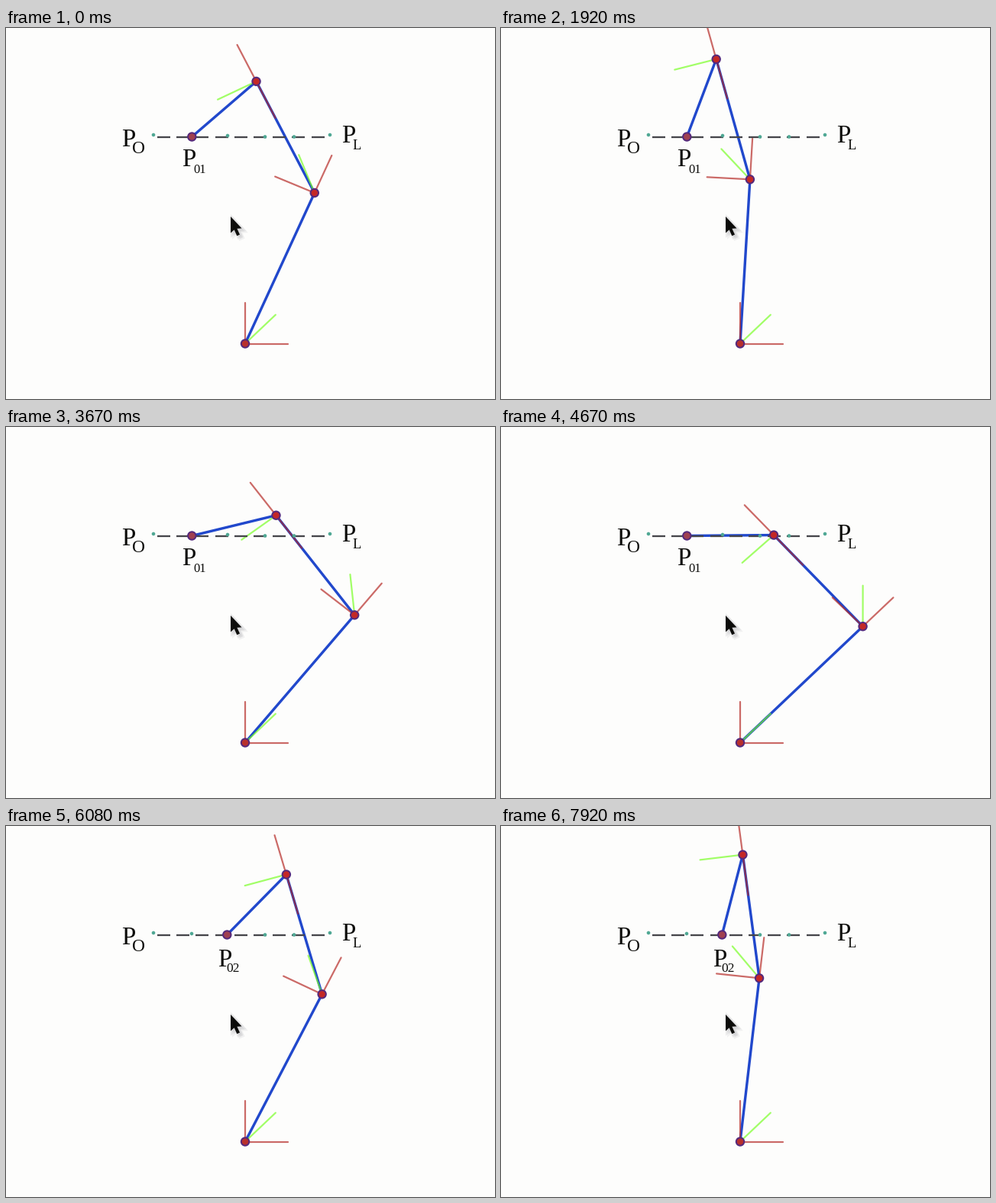
Write a matplotlib script that moves like this. It is 640 px wide and 486 px high and loops after 8 s.

```python
import numpy as np
import matplotlib.pyplot as plt
from matplotlib.animation import FuncAnimation
from matplotlib.patches import Circle, Polygon

W, H, DPI = 640, 486, 100
TICK_MS, LOOP_MS, STEPS = 20, 8000, 96
PX = 72 / DPI                       # points per pixel

BASE = np.array([313, 413.5])
STRETCH = np.array([1.053, 1])      # the picture is slightly wider than tall
L1, L2, L3 = 215.5, 163, 108        # links, base to tip
AXIS = 53.5
ENDS = [np.array([243.3, 142.5]), np.array([289.3, 142.5])]
SWITCH = 59                         # step at which the tip takes the second point

# Angle of the last link: three steady sweeps with a jump between them
KEY_STEPS = [0, 13, 24, 25, 32, 56, 58, 59, 65, 81, 95]
KEY_ANGLES = [42.2, 57.9, 71.5, 37, 28.2, 0.5, -1.9, 29.3, 36.5, 57.5, 76.2]

BG, INK = "#fdfdfc", "#0c0c0a"
BLUE, RED, GREEN = "#2148cc", "#b42420", "#76ff20"
RIM = "#55297c"

fig = plt.figure(figsize=(W / DPI, H / DPI), dpi=DPI, facecolor=BG)
ax = fig.add_axes([0, 0, 1, 1])
ax.set_xlim(0, W)
ax.set_ylim(H, 0)
ax.axis("off")


def line(color, width, z, alpha=1.0):
    return ax.plot([], [], color=color, lw=width * PX, alpha=alpha, zorder=z,
                   solid_capstyle="round")[0]


def axis_line(color):
    return line(color, 2.2, 4, 0.68)


def join(item, start, end):
    item.set_data([start[0], end[0]], [start[1], end[1]])


def joint(face):
    return ax.add_patch(Circle(BASE, 5.2, fc=face, ec=RIM,
                               lw=2 * PX, zorder=7))


def text(x, y, string, size):
    return ax.text(x, y, string, fontsize=size * PX, color=INK, zorder=8,
                   family="Liberation Serif", ha="left", va="baseline")


def label(x, y, sub, sub_x, sub_y, sub_size):
    return [text(x, y, "P", 33), text(sub_x, sub_y, sub, sub_size)]


def turn(v, degrees):
    """Turn a unit vector clockwise as seen on screen."""
    a = np.radians(degrees)
    c, s = np.cos(a), np.sin(a)
    return np.array([c * v[0] - s * v[1], s * v[0] + c * v[1]])


def screen(p):
    return BASE + STRETCH * p


def pose(step):
    """Elbow, wrist and tip of the arm, relative to the base."""
    tip = (ENDS[int(step >= SWITCH)] - BASE) / STRETCH
    a = np.radians(np.interp(step, KEY_STEPS, KEY_ANGLES))
    wrist = tip + L3 * np.array([np.cos(a), -np.sin(a)])
    d = np.hypot(*wrist)
    u = wrist / d
    along = (d * d + L1 * L1 - L2 * L2) / (2 * d)
    off = np.sqrt(max(L1 * L1 - along * along, 0))
    return along * u + off * turn(u, 90), wrist, tip


# Dashed guide with its marked points
for k in range(9):
    x = 198 + 25.2 * k
    ax.plot([x, x + 17], [143, 143], color="#45454a", lw=2.3 * PX, zorder=5,
            solid_capstyle="butt")
for x, y in [(193, 140), (243, 141), (290, 141), (339, 142.5),
             (377, 142.5), (424, 140)]:
    ax.add_patch(Circle((x, y), 2.3, fc="#4fa894", ec="none", zorder=6))

# Fixed labels and one for each tip position
label(151, 154.5, "O", 165, 163.5, 23.5)
label(439, 150, "L", 453.5, 158.5, 18.5)
tip_labels = [label(230.5, 180.5, "01", 245, 190, 16.5),
              label(277.5, 183.5, "02", 288.5, 190.5, 17.5)]

# Mouse pointer with a pale shadow
arrow = np.array([(294, 247), (294, 268.5), (298.7, 264.3), (302.3, 272.3),
                  (306, 270.6), (302.4, 262.8), (308.5, 262.4)])
for shift, alpha in [(2, 0.45), (4, 0.3)]:
    ax.add_patch(Polygon(arrow + shift, fc="#bdbdc0", ec="#d8d8da",
                         lw=4 * PX, alpha=alpha, zorder=8))
ax.add_patch(Polygon(arrow, fc=INK, ec="none", zorder=9))

# Base axes stay still
UP = np.array([0, -1])
for angle, color in [(45, GREEN), (0, RED), (90, RED)]:
    join(axis_line(color), BASE, screen(AXIS * turn(UP, angle)))

links = [line(BLUE, 3.4, 3) for _ in range(3)]
elbow_axes = [(-45, axis_line(GREEN)), (0, axis_line(RED)),
              (-90, axis_line(RED))]
wrist_axes = [(-90, axis_line(GREEN)), (0, axis_line(RED)),
              (180, axis_line(RED))]
joint("#b8302c")
elbow_dot, wrist_dot, tip_dot = joint("#c42826"), joint("#c42826"), joint("#a04050")


def place_axes(axes, origin, direction):
    for angle, item in axes:
        end = origin + AXIS * turn(direction, angle)
        join(item, screen(origin), screen(end))


def update(tick):
    # The arm moves in 96 steps; half a tick rounds each to the nearest tick
    step = int((tick + 0.5) * TICK_MS * STEPS / LOOP_MS + 1e-6)
    elbow, wrist, tip = pose(step)
    points = [screen(p) for p in (np.zeros(2), elbow, wrist, tip)]
    for item, start, end in zip(links, points, points[1:]):
        join(item, start, end)
    place_axes(elbow_axes, elbow, elbow / L1)
    place_axes(wrist_axes, wrist, (wrist - elbow) / L2)
    for dot, p in zip((elbow_dot, wrist_dot, tip_dot), points[1:]):
        dot.center = p
    for n, parts in enumerate(tip_labels):
        for part in parts:
            part.set_visible(n == int(step >= SWITCH))
    return []


anim = FuncAnimation(fig, update, frames=LOOP_MS // TICK_MS, interval=TICK_MS,
                     init_func=lambda: update(0), repeat=True, repeat_delay=0)
plt.show()
```
